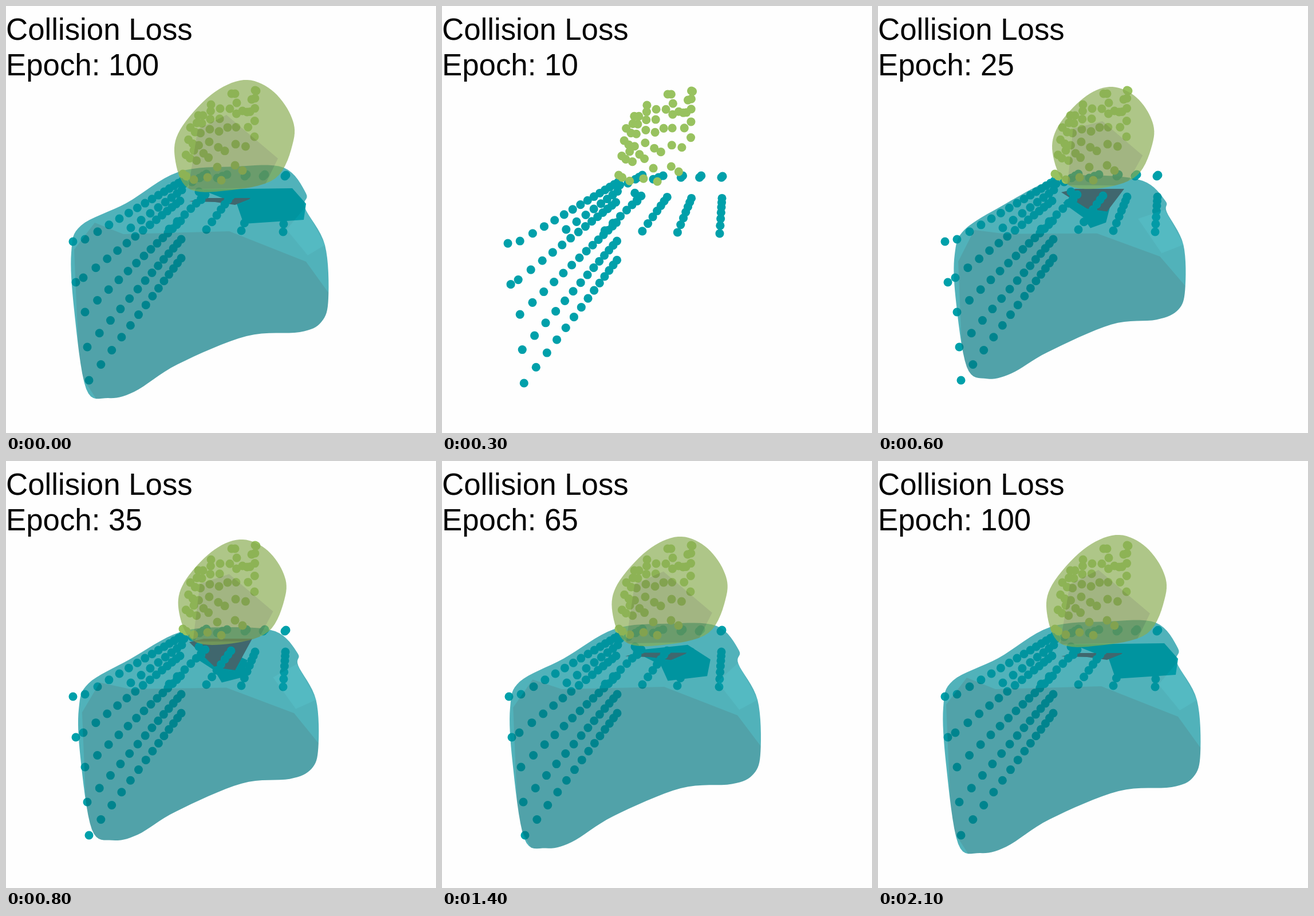
Recreate the animation shown at these times as an HTML page with a canvas. Size 751 by 745 pixels, loop 2.2 s.

```html
<!DOCTYPE html>
<html>
<head>
<meta charset="utf-8">
<style>
html, body { margin: 0; width: 100%; height: 100%; overflow: hidden; background: #fefefe; }
canvas { display: block; }
</style>
</head>
<body>
<canvas id="stage" width="751" height="745"></canvas>
<script>
const W = 751, H = 745;
const ctx = document.getElementById('stage').getContext('2d');
const layer = Object.assign(document.createElement('canvas'), { width: W, height: H });
const lctx = layer.getContext('2d');
const TEAL = '#00a0aa', GREEN = '#98c25f';

// Key points of each shape: when first grown (epoch 20) and at the end (epoch 100).
const body = [
  [310,326, 338,321, 425,343, 465,361, 475,372, 494,415, 492,470, 480,495, 443,511,
    386,522, 290,569, 248,588, 209,594, 180,566, 163,475, 167,440, 184,403, 235,352],
  [300,290, 400,280, 485,282, 524,327, 522,352, 557,417, 563,510, 551,551, 513,569,
    420,576, 300,625, 224,673, 178,684, 140,668, 119,530, 114,430, 131,383, 210,344]];
const face = [
  [175,480, 190,412, 250,397, 370,403, 440,422, 494,470, 620,720, 180,720, 178,563],
  [119,425, 155,378, 205,398, 390,393, 524,446, 563,500, 620,720, 180,720, 128,640]];
const shine = [
  [395,340, 465,361, 495,415, 443,425],
  [490,390, 522,352, 557,417, 527,435]];
const block = [
  [322,345, 338,324, 398,348, 390,378, 368,388, 355,370],
  [340,320, 500,318, 524,345, 520,373, 415,380, 403,345]];
const ball = [
  [386,161, 420,172, 441,200, 445,235, 422,288, 384,312, 345,295, 321,240, 332,200, 360,170],
  [415,129, 463,146, 497,190, 502,235, 470,301, 385,322, 318,318, 295,265, 304,216, 358,155]];
const shade = [
  [350,212, 404,219, 441,252, 405,307, 352,300],
  [335,215, 385,190, 475,266, 450,317, 318,320]];

// Dots from (x0, y0) to (x1, y1), each gap r times the one before.
const spread = (rows, r) => rows.flatMap(([x0, y0, x1, y1, n]) =>
  Array.from({ length: n }, (_, i) => {
    const k = (1 - r ** i) / (1 - r ** (n - 1));
    return [x0 + (x1 - x0) * k, y0 + (y1 - y0) * k];
  }));

const tealDots = [
  ...spread([[138,407, 308,305, 14], [135,474, 304,340, 14], [138,534, 305,375, 14],
    [142,595, 306,407, 14], [145,653, 306,440, 14]], .907),
  ...spread([[218,387, 307,321, 8], [312,364, 348,329, 5], [350,390, 393,331, 7],
    [411,392, 435,333, 7], [484,394, 488,333, 7], [117,411, 122,482, 2], [285,389, 299,376, 2],
    [337,324, 341,338, 2], [311,310, 325,307, 2], [338,300, 350,293, 3], [369,300, 386,294, 3],
    [417,297, 420,294, 2], [449,297, 452,294, 2], [487,297, 489,295, 2]], .88)];
const greenDots = spread([[435,147, 434,228, 5], [429,163, 413,287, 5], [403,169, 400,278, 5],
  [394,153, 376,304, 5], [374,179, 369,281, 5], [358,172, 352,299, 7], [344,191, 328,303, 6],
  [336,191, 315,297, 6], [322,212, 309,293, 4], [400,153, 437,148, 2], [413,183, 421,185, 2],
  [328,252, 345,257, 2]], 1.25);

const mix = ([a, b], k) => a.map((v, i) => v + (b[i] - v) * k);

function dots(list, color) {
  ctx.fillStyle = color;
  for (const [x, y] of list) {
    ctx.beginPath();
    ctx.arc(x, y, 7.5, 0, 7);
    ctx.fill();
  }
}

function poly(c, pts, color) {
  c.fillStyle = color;
  c.beginPath();
  for (let i = 0; i < pts.length; i += 2) c.lineTo(pts[i], pts[i + 1]);
  c.fill();
}

// Closed Catmull-Rom curve, sampled into short edges.
function smooth(pts) {
  const n = pts.length, out = [];
  for (let i = 0; i < n; i += 2)
    for (let t = 0; t < 1; t += .125)
      for (const axis of [0, 1]) {
        const [a, b, c, d] = [-2, 0, 2, 4].map(o => pts[(i + o + n) % n + axis]);
        out.push(b + t / 2 * (c - a + t * (2 * a - 5 * b + 4 * c - d + t * (3 * (b - c) + d - a))));
      }
  return out;
}

// Paints facets inside the outline, then lays the result over the stage.
function mesh(outline, color, facets) {
  lctx.globalCompositeOperation = 'source-over';
  lctx.clearRect(0, 0, W, H);
  poly(lctx, smooth(outline), color);
  lctx.globalCompositeOperation = 'source-atop';
  for (const [pts, fill] of facets) poly(lctx, pts, fill);
  ctx.globalAlpha = .68;
  ctx.drawImage(layer, 0, 0);
  ctx.globalAlpha = 1;
}

// The collision region is deepest near epoch 35, then thins out.
function collision(epoch) {
  const depth = Math.exp(-(((epoch - 35) / 15) ** 2));
  const top = 335 - 25 * depth, bottom = top + 12 + 43 * depth;
  poly(ctx, [320, top + 6, 345, top, 430, top, 400, bottom, 365, bottom - 5], '#c8140f');
}

function draw(epoch) {
  ctx.fillStyle = '#fefefe';
  ctx.fillRect(0, 0, W, H);
  ctx.fillStyle = '#000';
  ctx.font = '52.8px "Liberation Sans", Arial, sans-serif';
  ctx.fillText('Collision Loss', 0, 59);
  ctx.fillText('Epoch: ' + epoch, 0, 121);

  if (epoch <= 10) {
    // The camera sits slightly closer before the meshes appear.
    ctx.save();
    ctx.transform(1.008, 0, 0, 1.008, -2.9, -.2);
    dots(tealDots, TEAL);
    dots(greenDots, GREEN);
    ctx.restore();
    return;
  }

  const progress = (epoch - 20) / 80;
  const grown = Math.sign(progress) * Math.abs(progress) ** .17;
  poly(ctx, mix(block, progress), TEAL);
  if (epoch > 20) collision(epoch);
  dots(tealDots, TEAL);
  mesh(mix(body, grown), '#008f9b', [[mix(shine, grown), '#049aa6'], [mix(face, grown), '#007881']]);
  dots(greenDots, GREEN);
  mesh(mix(ball, grown), '#89ad51', [[mix(shade, grown), '#789348']]);
}

const start = performance.now();
function tick() {
  const step = Math.floor((performance.now() - start) / 100) % 22;
  draw(step ? (step - 1) * 5 : 100);
  requestAnimationFrame(tick);
}
tick();
</script>
</body>
</html>
```
